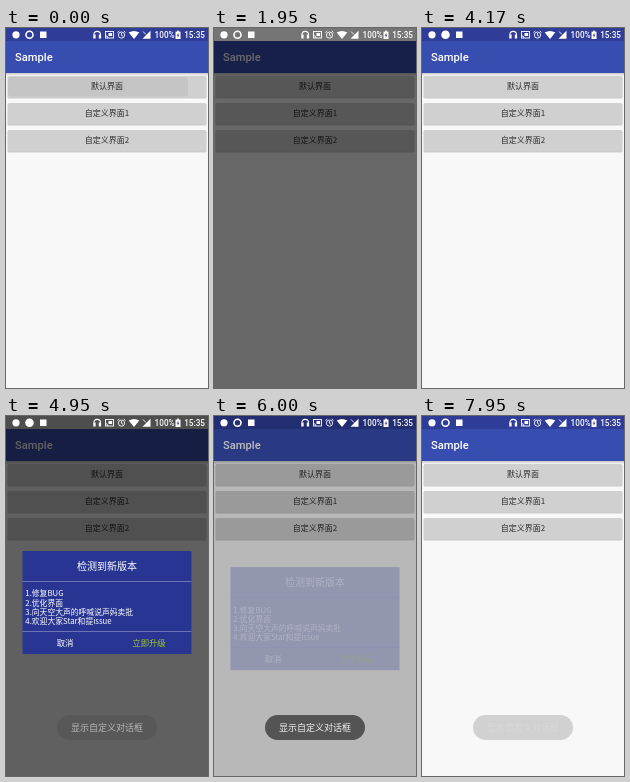
Animation of 202x360 px, one loop 8 s. Source, as an HTML page with a canvas:

```html
<!DOCTYPE html>
<html lang="zh-CN">
<head>
<meta charset="utf-8">
<title>Sample</title>
<style>
  html, body { margin: 0; width: 100%; height: 100%; overflow: hidden; background: #f8f8f8; }
  canvas { display: block; width: 202px; height: 360px; }
</style>
</head>
<body>
<canvas id="stage"></canvas>
<script>
const W = 202, H = 360, LOOP = 8000;
const SANS = '"Noto Sans CJK SC", "Noto Sans CJK", sans-serif';
const LATIN = 'Roboto, sans-serif';
const canvas = document.getElementById('stage');
const ctx = canvas.getContext('2d');
const scale = window.devicePixelRatio || 1;
canvas.width = W * scale;
canvas.height = H * scale;

// Keyframes are [time, value] pairs with linear motion between them.
const DIM = [[1410, 0], [1680, .58], [2010, .58], [2190, .03], [2370, 0],
  [4500, 0], [4800, .61], [5790, .61], [6000, .26], [6150, 0]];
const GRAY_BAR = [[1409, 0], [1410, 1], [2010, 1], [2190, 0],
  [4500, 0], [4560, 1], [5790, 1], [5970, 0]];
const BAR_TONE = [[2370, 117], [4440, 78]];
const DIALOG = [[4560, 0], [4860, 1], [5790, 1], [6000, .26], [6120, 0]];
const TOAST = [[4650, 0], [5040, .8], [5220, 1], [6060, 1], [6540, .24]];
const BLINKS = [90, 1750, 2640, 3330, 4170, 5000, 5400, 5900, 6480, 7020];

function at(keys, t) {
  if (t <= keys[0][0]) return keys[0][1];
  for (let i = 1; i < keys.length; i++) {
    const [t0, v0] = keys[i - 1], [t1, v1] = keys[i];
    if (t < t1) return v0 + (v1 - v0) * (t - t0) / (t1 - t0);
  }
  return keys[keys.length - 1][1];
}

function rect(x, y, w, h, color) {
  ctx.fillStyle = color;
  ctx.fillRect(x, y, w, h);
}

function pill(x, y, w, h, r, color) {
  ctx.fillStyle = color;
  ctx.beginPath();
  ctx.roundRect(x, y, w, h, r);
  ctx.fill();
}

function text(str, x, y, size, color, weight = 400, align = 'center', family = SANS) {
  ctx.font = `${weight} ${size}px ${family}`;
  ctx.textAlign = align;
  ctx.textBaseline = 'alphabetic';
  ctx.fillStyle = color;
  ctx.fillText(str, x, y);
}

function poly(...p) {
  ctx.beginPath();
  for (let i = 0; i < p.length; i += 2) ctx.lineTo(p[i], p[i + 1]);
  ctx.closePath();
  ctx.fill();
}

function arc(x, y, r, from = 0, to = Math.PI * 2) {
  ctx.beginPath();
  ctx.arc(x, y, r, from, to);
}

function button(label, y, pressed) {
  pill(1.5, y + .8, 199, 21.7, 1.5, 'rgba(0,0,0,.18)');
  pill(2, y, 198, 21.3, 1.2, '#d0d0d0');
  if (pressed) pill(2, y + 1, 180, 19.5, 3, 'rgba(0,0,0,.05)');
  text(label, 101, y + 13, 8, '#2c2c2c', 500);
}

function page(t) {
  rect(0, 0, W, H, '#f8f8f8');
  const shade = ctx.createLinearGradient(0, 45, 0, 48);
  shade.addColorStop(0, 'rgba(0,0,0,.2)');
  shade.addColorStop(1, 'rgba(0,0,0,0)');
  rect(0, 45, W, 3, shade);
  rect(0, 0, W, 13, '#2f3c98');
  rect(0, 13, W, 32, '#384db0');
  text('Sample', 9, 33.2, 11.2, '#fff', 500, 'left', LATIN);
  button('默认界面', 48, t < 1410);
  button('自定义界面1', 75);
  button('自定义界面2', 102);
}

function statusIcons(t) {
  ctx.fillStyle = ctx.strokeStyle = '#fff';
  arc(10, 6.8, 3.6);
  ctx.fill();

  const solid = BLINKS.filter(b => t >= b).length % 2 === 1;
  ctx.lineWidth = 1.6;
  arc(23.5, 6.8, 3.5);
  if (solid) ctx.fill();
  ctx.stroke();

  ctx.fillRect(34, 3.5, 6.5, 6.5);

  // headphones
  ctx.lineWidth = 1.1;
  arc(91.2, 6.7, 3.3, Math.PI, 0);
  ctx.stroke();
  ctx.fillRect(87.3, 6.5, 2.3, 4);
  ctx.fillRect(92.8, 6.5, 2.3, 4);

  // screen cast
  ctx.lineWidth = .9;
  ctx.strokeRect(99.5, 3.5, 8, 6.5);
  ctx.fillRect(102.5, 5, 3.6, 3);
  arc(99.5, 10, 2.4, -Math.PI / 2, 0);
  ctx.stroke();

  // alarm clock
  arc(115.5, 7.1, 3.1);
  ctx.stroke();
  ctx.beginPath();
  ctx.moveTo(115.5, 5); ctx.lineTo(115.5, 7.4); ctx.lineTo(117, 8.3);
  ctx.moveTo(111.5, 4.5); ctx.lineTo(113.3, 3);
  ctx.moveTo(119.5, 4.5); ctx.lineTo(117.7, 3);
  ctx.stroke();

  // wifi and signal
  ctx.beginPath();
  ctx.moveTo(128, 11);
  ctx.lineTo(122.7, 4.6);
  ctx.quadraticCurveTo(128, 1.4, 133.3, 4.6);
  ctx.fill();
  poly(136.5, 10.7, 144.5, 10.7, 144.5, 2.8);
  ctx.beginPath();
  ctx.moveTo(137, 3.5); ctx.lineTo(140, 6.5);
  ctx.stroke();

  text('100%', 148.6, 10, 8.2, '#fff', 500, 'left', LATIN);

  // charging battery
  ctx.fillStyle = '#fff';
  ctx.fillRect(169.5, 3.6, 5, 7.4);
  ctx.fillRect(171, 2.6, 2, 1.2);
  ctx.fillStyle = '#555b80';
  poly(172.4, 4.6, 170.6, 7.7, 171.8, 7.7, 171.6, 10, 173.5, 6.8, 172.3, 6.8);

  text('15:35', 199, 10, 8.2, '#fff', 500, 'right', LATIN);
}

function dialog(t) {
  const alpha = at(DIALOG, t);
  if (!alpha) return;
  const leave = Math.max(0, (t - 5790) / 210);
  const enter = Math.max(0, (4860 - t) / 300);
  ctx.save();
  ctx.globalAlpha = alpha;
  ctx.translate(0, 16 * leave * leave + 16 * enter * enter);
  rect(16.5, 135, 169, 103, '#283593');
  text('检测到新版本', 101, 154.3, 10, '#fff');
  rect(16.5, 165, 169, .8, '#7c84bd');
  ['1.修复BUG', '2.优化界面', '3.向天空大声的呼喊说声妈卖批', '4.欢迎大家Star和提issue']
    .forEach((line, i) => text(line, 19.3, 180.4 + i * 9.3, 7.8, '#fff', 400, 'left'));
  rect(16.5, 215, 169, .8, '#7c84bd');
  text('取消', 59, 230, 8.4, '#fff', 500);
  text('立即升级', 143, 230, 8.4, '#a2c928', 500);
  ctx.restore();
}

function toast(t) {
  const alpha = at(TOAST, t);
  if (!alpha) return;
  ctx.save();
  ctx.globalAlpha = alpha;
  pill(51, 299, 100, 25, 12.5, '#545454');
  text('显示自定义对话框', 101, 314.8, 9, '#f2f2f2');
  ctx.restore();
}

function draw(t) {
  ctx.setTransform(scale, 0, 0, scale, 0, 0);
  page(t);
  rect(0, 0, W, H, `rgba(0,0,0,${at(DIM, t)})`);
  const tone = Math.round(at(BAR_TONE, t));
  rect(0, 0, W, 13, `rgba(${tone},${tone},${tone},${at(GRAY_BAR, t)})`);
  dialog(t);
  toast(t);
  statusIcons(t);
}

const start = performance.now();
function tick() {
  draw((performance.now() - start) % LOOP);
  requestAnimationFrame(tick);
}
tick();
</script>
</body>
</html>
```
